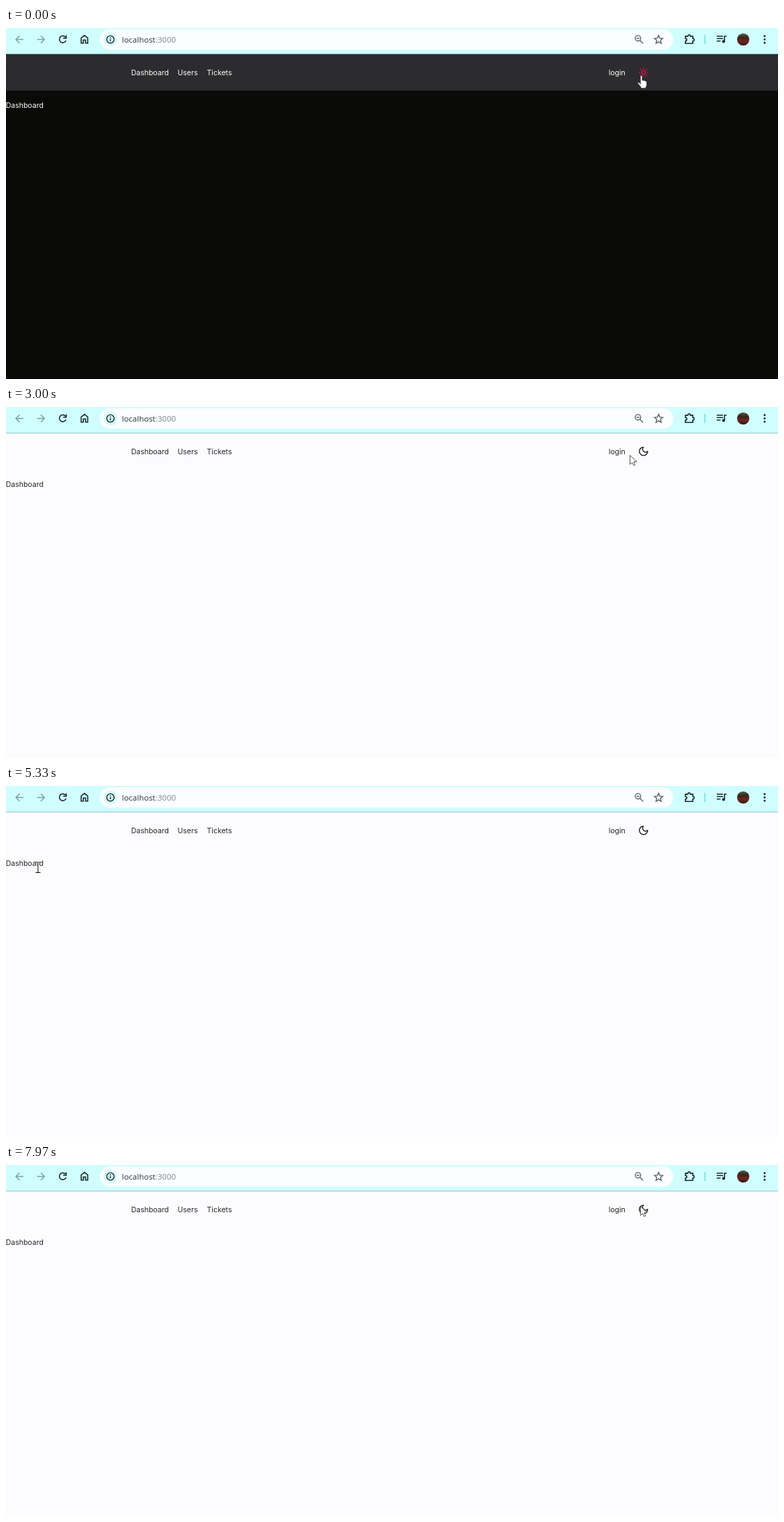
Recreate the animation shown at these times as an HTML page. Size 1109x505 px, loop 8 s.

```html
<!DOCTYPE html>
<html lang="en">
<head>
<meta charset="utf-8">
<title>Theme toggle</title>
<style>
html, body { margin: 0; width: 100%; height: 100%; overflow: hidden; }
svg { display: block; }
#stage { --page: #fcfcff; --bar: #fcfcff; --ink: #252525; --edge: #9cc6c9; }
#stage.dark { --page: #0a0a09; --bar: #2c2c2e; --ink: #fff; --edge: #6b8f91; }
.page { fill: var(--page); }
.bar { fill: var(--bar); }
.edge { fill: var(--edge); }
.site { font: 10.5px Inter, sans-serif; fill: var(--ink); }
.picked { fill: #fff; }
.url { font: 11.5px "Open Sans", "Noto Sans", sans-serif; fill: #30353a; }
.line { fill: none; stroke: #1d2a2b; stroke-width: 1.6; }
.faint { stroke: #7fa3a1; }
.gray { stroke: #5b6266; stroke-width: 1.4; }
.dots { fill: none; stroke: #1d2a2b; stroke-width: 2.9; stroke-linecap: round; stroke-dasharray: 0 4.8; }
.icon { fill: none; stroke-width: 2; stroke-linecap: round; stroke-linejoin: round; }
.pointer { fill: #fff; stroke: #2c2c2c; stroke-width: .8; stroke-linejoin: round; }
#beam { fill: none; stroke: #fff; mix-blend-mode: difference; }
</style>
</head>
<body>
<svg id="stage" class="dark" width="1109" height="505" viewBox="0 0 1109 505">
  <defs>
    <linearGradient id="photo" x2="0" y2="1">
      <stop offset="0" stop-color="#57604a"/>
      <stop offset=".35" stop-color="#38241c"/>
      <stop offset=".65" stop-color="#702420"/>
      <stop offset="1" stop-color="#2c1c1a"/>
    </linearGradient>
    <clipPath id="clip"><rect id="clipBox" y="104" width="0" height="15"/></clipPath>
  </defs>

  <rect class="page" width="1109" height="505"/>
  <rect class="bar" y="38" width="1109" height="52"/>
  <rect width="1109" height="37" fill="#d0feff"/>
  <rect class="edge" y="37" width="1109" height="1"/>

  <rect x="135" y="2" width="823.5" height="29" rx="14.5" fill="#fbfdff"/>
  <circle cx="150" cy="16.5" r="10" fill="#d6fbfd"/>
  <g class="line">
    <g class="faint">
      <path d="M25 16.5H14.5M19.5 11.3L14.3 16.5 19.5 21.7"/>
      <path d="M44.5 16.5H55M50 11.3L55.2 16.5 50 21.7"/>
    </g>
    <path d="M85.6 13.4A4.9 4.9 0 1 0 86.2 17.9M86.5 10.6V14.8H82.2"/>
    <path d="M108 21.7V14.3L112.7 10.6 117.4 14.3V21.7H114.3V17.2H111.1V21.7Z"/>
    <circle cx="150" cy="16.4" r="5.3" stroke-width="1.4"/>
    <path d="M150 15.8V19.3M150 13.3V14.7" stroke-width="1.4"/>
    <g class="gray">
      <circle cx="907.8" cy="14.8" r="3.9"/>
      <path d="M910.7 17.7L915.2 22.2M905.9 14.8H909.7"/>
      <path d="M937.5 10.6L939.2 14.6 943.5 15 940.2 17.8 941.2 22 937.5 19.8 933.8 22 934.8 17.8 931.5 15 935.8 14.6Z"/>
    </g>
    <path d="M976 11.9H979.5C979.3 9.2 983.3 9.2 983.1 11.9H986.6V15.1C989.3 15 989.3 19 986.6 18.9V22.3H976V18.9C978.6 18.7 978.6 15.3 976 15.1Z"/>
    <path d="M1021 11.7H1030M1021 15.2H1030M1021 18.7H1026.5M1032.2 19.4V11.7H1035.2"/>
  </g>
  <circle cx="1030.8" cy="19.4" r="2.1" fill="#1d2a2b"/>
  <path d="M1004 10V23" stroke="#7fdde3" stroke-width="1.6"/>
  <circle cx="1059" cy="16.5" r="8.8" fill="url(#photo)"/>
  <path class="dots" d="M1089.8 11.7v9.7"/>
  <text class="url" x="166.5" y="20.6">localhost<tspan fill="#7d868a">:3000</tspan></text>

  <g class="site">
    <text class="link" x="179.7" y="67.6">Dashboard</text>
    <text class="link" x="246.5" y="67.6">Users</text>
    <text class="link" x="288.6" y="67.6">Tickets</text>
    <text class="link" x="865.7" y="67.6">login</text>
    <text x="-.3" y="115">Dashboard</text>
  </g>
  <g clip-path="url(#clip)">
    <rect y="104" width="60" height="15" fill="#3275ee"/>
    <text class="site picked" x="-.3" y="115">Dashboard</text>
  </g>

  <g class="icon" transform="translate(907.8 55.8) scale(.667)">
    <g id="sun" stroke="#e0124f">
      <circle cx="12" cy="12" r="4"/>
      <path id="rays"/>
    </g>
    <path id="moon" d="M12 3a6 6 0 0 0 9 9 9 9 0 1 1-9-9Z"/>
  </g>

  <g id="cursor">
    <path id="arrow" class="pointer" d="M.4.5V13.5L3.6 10.7 5.7 15.2 7.8 14.2 5.8 9.8H10.2Z"/>
    <path id="hand" class="pointer" transform="translate(-5 -1.3) scale(1.06)" d="M4 12V2q0-1.5 1.3-1.5T6.6 2V7.2q1.2-.9 2.2.4 1.2-.7 2.1.5 1.8-.3 1.8 1.6V13q0 2-1.2 3.5V18H5.2Q4.6 15.4 1.2 12 0 10 1.6 9.6 2.6 9.6 4 12Z"/>
    <path id="beam" d="M-3.5 -7.5H3.5M0 -7.5V7.5M-3.5 7.5H3.5"/>
  </g>
</svg>
<script>
const $ = id => document.getElementById(id);
const LOOP = 8000, LIGHT = 1630, LEAVE = 2330;
const PRESS = 5450, RELEASE = 6000, CLEAR = 6870;
const WORD_LEFT = 31, WORD_RIGHT = 47, LETTER = 5.3;

// Each move eases the mouse to a new resting point
const start = { x: 912, y: 69 };
const moves = [
  { from: 2200, to: 2570, x: 896, y: 69 },
  { from: 3000, to: 3800, x: 302, y: 54 },
  { from: 3830, to: 4230, x: 254, y: 60 },
  { from: 4370, to: 4850, x: 29, y: 60 },
  { from: 4850, to: 5030, x: 46, y: 119 },
  { from: 5270, to: PRESS, x: 47, y: 112 },
  { from: PRESS, to: RELEASE, x: 36, y: 110 },
  { from: 6270, to: 6700, x: 165, y: 100 },
  { from: CLEAR, to: 7670, x: 738, y: 76 },
  { from: 7670, to: 7970, x: 911, y: 59 }
];

const ease = k => k * k * (3 - 2 * k);
const clamp = k => Math.min(1, Math.max(0, k));

function mouseAt(t) {
  let { x, y } = start;
  for (const m of moves) {
    const k = ease(clamp((t - m.from) / (m.to - m.from)));
    x += (m.x - x) * k;
    y += (m.y - y) * k;
  }
  return { x, y };
}

const links = [...document.querySelectorAll(".link")];

function isOver(el, { x, y }) {
  const b = el.getBBox();
  return x >= b.x && x <= b.x + b.width && y >= b.y && y <= b.y + b.height;
}

function shapeAt(t, mouse) {
  if (t < LEAVE || links.some(el => isOver(el, mouse))) return "hand";
  return mouse.x < 54 && mouse.y >= 104 && mouse.y < 119 ? "beam" : "arrow";
}

function rays() {
  let d = "";
  for (let i = 0; i < 8; i++) {
    const a = i * Math.PI / 4, c = Math.cos(a), s = Math.sin(a);
    d += `M${12 + 8 * c} ${12 + 8 * s}l${2 * c} ${2 * s}`;
  }
  return d;
}

const show = (id, on) => $(id).setAttribute("visibility", on ? "visible" : "hidden");

function draw() {
  const t = performance.now() % LOOP, dark = t < LIGHT;
  const mouse = mouseAt(t), shape = shapeAt(t, mouse);
  $("stage").classList.toggle("dark", dark);
  show("sun", dark);
  show("moon", !dark);
  $("moon").setAttribute("stroke", t < LEAVE ? "#d0124c" : "#151515");

  $("cursor").setAttribute("transform", `translate(${Math.round(mouse.x)} ${Math.round(mouse.y)})`);
  for (const id of ["arrow", "hand", "beam"]) show(id, id === shape);

  // The selection snaps to letter edges
  const letters = Math.floor((mouseAt(Math.min(t, RELEASE)).x - WORD_LEFT) / LETTER);
  const left = WORD_LEFT + letters * LETTER;
  $("clipBox").setAttribute("x", left);
  $("clipBox").setAttribute("width", t >= PRESS && t < CLEAR ? Math.max(0, WORD_RIGHT - left) : 0);
  requestAnimationFrame(draw);
}

$("rays").setAttribute("d", rays());
draw();
</script>
</body>
</html>
```
